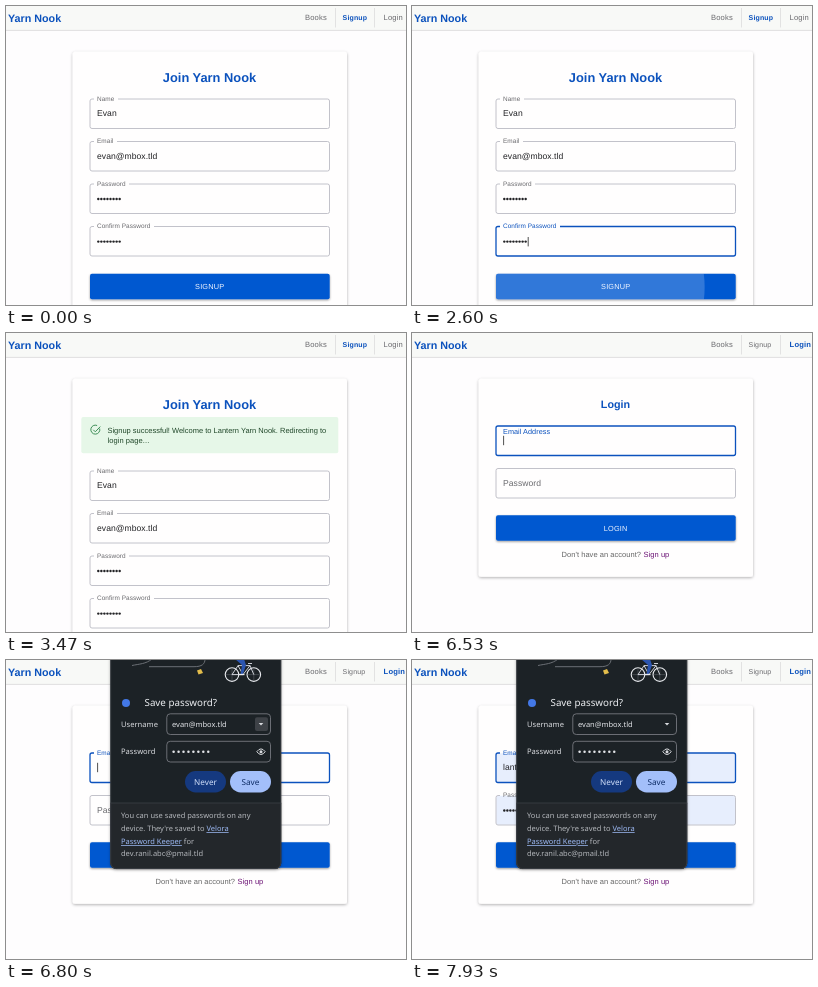
Animation, 400 px wide and 299 px high, one loop 8000 ms. Source, as an HTML page:

```html
<!DOCTYPE html>
<html lang="en">
<head>
<meta charset="utf-8">
<title>Sign up and log in</title>
<style>
html, body { margin: 0; width: 100%; height: 100%; overflow: hidden; background: #fefdfe; }
svg { display: block; width: 100vw; height: 100vh; }
text { font-family: "Liberation Sans", Arial, sans-serif; text-rendering: geometricPrecision; white-space: pre; }
.ui text { font-family: "Noto Sans", "Open Sans", sans-serif; }
</style>
</head>
<body>
<svg id="stage" viewBox="0 0 400 299" xmlns="http://www.w3.org/2000/svg"></svg>
<script>
const LOOP = 8000;
const BLUE = '#0c52bd', FILL = '#0358d0', GREY = '#6a6a6e', INK = '#222225', LINE = '#bcbcc4';
const SITE = 'Yarn Nook', NAME = 'Evan', MAIL = 'evan@mbox.tld';

// Times of the events, in ms
const T = { focus: 730, press: 2330, release: 2580, blur: 3200, alert: 3470,
            login: 6530, bubble: 6600, fill: 7400 };

const $ = id => document.getElementById(id);
const clamp = v => Math.max(0, Math.min(1, v));
const span = (t, from, length) => clamp((t - from) / length);
const easeOut = p => 1 - (1 - p) ** 3;
const mix = (a, b, p) => a + (b - a) * p;
const rgb = hex => [1, 3, 5].map(i => parseInt(hex.slice(i, i + 2), 16));
const blend = (a, b, p) => {
  const to = rgb(b);
  return `rgb(${rgb(a).map((v, i) => Math.round(mix(v, to[i], p)))})`;
};

const text = (x, y, size, fill, str, more = '') =>
  `<text x="${x}" y="${y}" font-size="${size}" fill="${fill}" ${more}>${str}</text>`;
const box = (x, y, w, h, r, fill, more = '') =>
  `<rect x="${x}" y="${y}" width="${w}" height="${h}" rx="${r}" fill="${fill}" ${more}/>`;
const dots = (x, y, step, r, fill) =>
  Array.from({ length: 8 }, (_, i) => `<circle cx="${x + i * step}" cy="${y}" r="${r}" fill="${fill}"/>`).join('');
const caret = (id, x, y) => `<path id="${id}" d="M${x} ${y}v9.4" stroke="#222" stroke-width=".8"/>`;
const mid = 'text-anchor="middle"';
const bold = 'font-weight="700"';

// Outline of an input, with a gap in its top edge for the label
const outline = (y, gap) => `M${88 + gap} ${y}H321.5a2 2 0 0 1 2 2v25.5a2 2 0 0 1-2 2H86a2 2 0 0 1-2-2V${y + 2}a2 2 0 0 1 2-2h2`;

const field = (id, y, label, gap, value) =>
  `<path id="${id}Line" d="${outline(y, gap)}" fill="none" stroke="${LINE}" stroke-width=".9"/>` +
  text(91, y + 1.6, 6.43, GREY, label, `id="${id}Label" letter-spacing=".06"`) + value;

const entry = (y, str) => text(91, y + 17, 8.57, INK, str, 'letter-spacing=".05"');

const button = (y, label) =>
  box(84, y, 239.7, 25.5, 2, FILL, 'filter="url(#low)"') +
  `<g id="${label}Ripple"></g>` +
  text(203.7, y + 15.4, 7.35, '#f2f6ff', label, `${mid} letter-spacing=".17"`);

const nav = (x, id, label, size) => text(x, 14.4, size, GREY, label, `id="${id}" letter-spacing=".15"`);

const header =
  box(0, 0, 400, 24, 0, '#f8f9f7') +
  '<path d="M0 24.4H400" stroke="#dcdcdc" stroke-width=".9"/>' +
  text(2, 15.6, 10.75, BLUE, SITE, bold) +
  nav(299, 'navBooks', 'Books', 7.6) + nav(336.6, 'navSignup', 'Signup', 7) + nav(377.6, 'navLogin', 'Login', 7.6) +
  '<path d="M329.5 2V21.5M368.5 2V21.5" stroke="#dfdfdf" stroke-width=".9"/>';

const card = h => box(66.7, 45.7, 274.3, h, 2.5, '#fffefe', 'filter="url(#high)"');

const signup =
  card(300) +
  text(203.5, 76, 12.85, BLUE, 'Join ' + SITE, `${mid} ${bold}`) +
  `<g id="alert">${box(75.3, 84, 257, 36.3, 2, '#e6f7e8')}
    <path d="M93.7 95.6a4.5 4.5 0 1 1-2.6-3.1M87.3 96.8l2 2 5-5.2" fill="none" stroke="#3f8f58" stroke-width="1"/>` +
    text(101.4, 100, 7.5, '#21482a', `Signup successful! Welcome to Lantern ${SITE}. Redirecting to`) +
    text(101.4, 110.4, 7.5, '#21482a', 'login page...', 'letter-spacing=".08"') +
  '</g><g id="form">' +
  field('name', 93, 'Name', 24, entry(93, NAME)) +
  field('mail', 135.5, 'Email', 23, entry(135.5, MAIL)) +
  field('pass', 178, 'Password', 35, dots(92.3, 193, 3.05, 1.2, INK)) +
  field('again', 220.5, 'Confirm Password', 60, dots(92.3, 235.6, 3.05, 1.2, INK) + caret('againCaret', 116.2, 231)) +
  button(267.7, 'SIGNUP') + '</g>';

const login =
  card(198) +
  text(203.5, 75, 10.75, BLUE, 'Login', `${mid} ${bold}`) +
  box(84.3, 93.3, 239, 29, 2, '#e7eefd', 'class="auto"') +
  box(84.3, 135.8, 239, 29, 2, '#e7eefd', 'class="auto"') +
  field('user', 93, 'Email Address', 47, caret('userCaret', 91.6, 102.8)) +
  field('key', 135.5, 'Password', 35, '') +
  `<g class="auto">${entry(93, 'lantern@mbox.tld')}${dots(92.3, 150.5, 3.05, 1.2, INK)}</g>` +
  button(182.2, 'LOGIN') +
  text(149.6, 224.4, 7.5, '#666', "Don't have an account?", 'letter-spacing=".04"') +
  text(231.6, 224.4, 7.5, '#6d1476', 'Sign up', 'letter-spacing=".04"');

const wheel = x => `<circle cx="${x}" cy="14.6" r="6.8" fill="none" stroke="#e8eaee" stroke-width="1.1"/>
  <path d="M${x - 6} 14.6h12M${x} 8.6v12" stroke="#777c85" stroke-width=".4"/>`;

const input = (y, label) => text(115, y + 13, 7.6, '#d9dbdf', label) +
  box(160.8, y, 103.7, 20.7, 3.5, 'none', 'stroke="#75787e" stroke-width=".9"');

const small = (x, y, str, fill = '#b4b7bc', more = '') => text(x, y, 7.5, fill, str, more);
const link = 'text-decoration="underline"';

const bubble = `
  <path d="M104.3-8H275.2V203a6 6 0 0 1-6 6H110.3a6 6 0 0 1-6-6Z" fill="#1e2125" filter="url(#high)"/>
  <path d="M104.3 143H275.2V203a6 6 0 0 1-6 6H110.3a6 6 0 0 1-6-6Z" fill="#23272b"/>
  <path d="M104.3 143H275.2" stroke="#3b3f44" stroke-width=".8"/>
  <path d="M104.7-8V203a5.6 5.6 0 0 0 5.6 5.6H269.2a5.6 5.6 0 0 0 5.6-5.6V-8" fill="none" stroke="#43474c" stroke-width=".7"/>
  <path d="M126 5.5C133 4 140 4 146-1M143 6.7H188C196 6.7 199 4 199-1" fill="none" stroke="#6b6f75" stroke-width="1"/>
  <path d="M191 10.5l4-1.5 2 4-4.5 1.5Z" fill="#e3bd4b"/>
  ${wheel(226)}${wheel(247.8)}
  <path d="M226 14.6l6-9h12l-7 9Zm18-9 3.8 9M232 5.6l5 9M242 3.5h4" fill="none" stroke="#dfe3ea" stroke-width=".9"/>
  <path d="M229-1h9l2 6-3 9h-2.4l1.4-9Z" fill="#2b55b0"/>
  <path d="M233 14.5h5.5" stroke="#e8eaee" stroke-width="1.3"/>
  <circle cx="120" cy="43" r="4" fill="#4378e6"/>
  ${text(138.5, 46.4, 9.8, '#eceef1', 'Save password?')}
  ${input(53.8, 'Username')}${input(81.3, 'Password')}
  ${box(249, 57.3, 13, 13.6, 2, '#3e4247', 'id="drop"')}
  <path d="M252.7 63h4.6l-2.3 2.4Z" fill="#d9dbdf"/>
  ${text(166, 66.8, 7.5, '#e2e4e8', MAIL)}
  ${dots(167.6, 91.8, 4.95, 1.25, '#e2e4e8')}
  <path d="M250.8 91.7q4.2-5.6 8.4 0q-4.2 5.6-8.4 0Z" fill="none" stroke="#d9dbdf" stroke-width="1"/>
  <circle cx="255" cy="91.7" r="1.5" fill="#d9dbdf"/>
  ${box(179, 111, 41, 21.4, 10.7, '#15397f')}
  ${text(199.5, 124.7, 8.2, '#d3e1fb', 'Never', mid + ' font-weight="500"')}
  ${box(224, 111, 41, 21.4, 10.7, '#a3bffa')}
  ${text(244.4, 124.7, 8.2, '#0d2c66', 'Save', mid + ' font-weight="500"')}
  ${small(115, 158, 'You can use saved passwords on any')}
  ${small(115, 171, `device. They're saved to <tspan fill="#9dbaf5" ${link}>Velora</tspan>`)}
  ${small(115, 184, `<tspan fill="#9dbaf5" ${link}>Password Keeper</tspan> for`)}
  ${small(115, 196.4, 'dev.ranil.abc@pmail.tld')}`;

$('stage').innerHTML = `
  <defs>
    <filter id="high" x="-10%" y="-10%" width="120%" height="120%">
      <feDropShadow dx="0" dy="1" stdDeviation="1.5" flood-color="#000" flood-opacity=".32"/></filter>
    <filter id="low" x="-5%" y="-20%" width="110%" height="150%">
      <feDropShadow dx="0" dy="1" stdDeviation=".9" flood-color="#000" flood-opacity=".4"/></filter>
    <clipPath id="face"><rect x="84" y="267.7" width="239.7" height="25.5" rx="2"/></clipPath>
  </defs>
  ${box(0, 0, 400, 299, 0, '#fefdfe')}
  <g id="signup">${signup}</g><g id="login">${login}</g>${header}<g id="bubble" class="ui">${bubble}</g>`;

$('SIGNUPRipple').innerHTML = '<g clip-path="url(#face)"><circle id="ripple" cx="185" cy="281" fill="#fff"/></g>';

const set = (id, attrs) => { for (const k in attrs) $(id).setAttribute(k, attrs[k]); };
const show = (el, on) => el.setAttribute('visibility', on ? 'visible' : 'hidden');

function focus(id, p) {
  set(id + 'Line', { stroke: blend(LINE, BLUE, p), 'stroke-width': mix(.9, 1.3, p) });
  set(id + 'Label', { fill: blend(GREY, BLUE, p) });
}

// Label moves from inside the field (0) onto its edge (1)
function float(id, y, gap, p, open) {
  set(id + 'Label', { y: mix(y + 17.7, y + 1.6, p), 'font-size': mix(8.57, 6.43, p) });
  set(id + 'Line', { d: outline(y, gap * open) });
}

function draw(t) {
  const onLogin = t >= T.login;
  $('signup').style.display = onLogin ? 'none' : '';
  $('login').style.display = onLogin ? '' : 'none';

  for (const [id, on] of [['navSignup', !onLogin], ['navLogin', onLogin]])
    set(id, { fill: on ? BLUE : GREY, 'font-weight': on ? 700 : 400 });

  const active = t >= T.focus && t < T.blur;
  focus('again', span(t, T.focus, 200) - span(t, T.blur, 200));
  show($('againCaret'), active);

  const grow = easeOut(span(t, T.press, 560));
  set('ripple', { r: 125 * grow,
    opacity: t < T.press ? 0 : mix(.1, .2, span(t, T.press, 250)) * (1 - span(t, T.release, 550)) });

  const done = t >= T.alert;
  $('alert').style.display = done ? '' : 'none';
  set('form', { transform: `translate(0 ${done ? 45 : 0})` });

  const filled = t >= T.fill;
  focus('user', 1);
  float('user', 93, 47, easeOut(span(t, T.login - 54, 200)), span(t, T.login + 10, 100));
  float('key', 135.5, 35, easeOut(span(t, T.fill, 200)), span(t, T.fill + 50, 100));
  show($('userCaret'), onLogin && !filled);
  document.querySelectorAll('.auto').forEach(el => { el.style.display = filled ? '' : 'none'; });

  set('bubble', { opacity: span(t, T.bubble, 130) });
  set('drop', { opacity: 1 - span(t, 6900, 300) });
}

let start;
function tick(now) {
  start ??= now;
  draw((now - start) % LOOP);
  requestAnimationFrame(tick);
}
draw(0);
requestAnimationFrame(tick);
</script>
</body>
</html>
```
